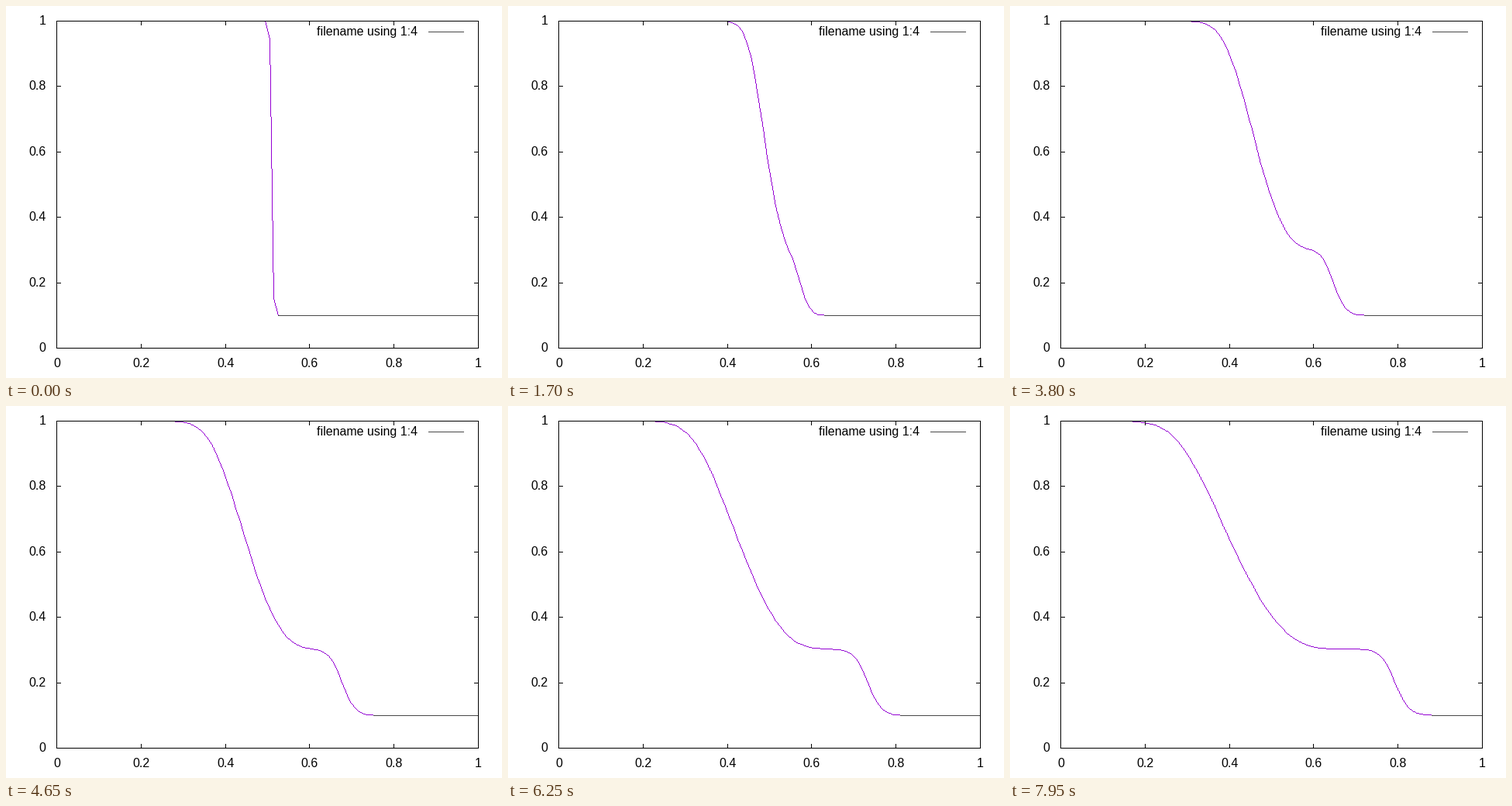
A matplotlib script for the animation above (8 s loop, 640x480 px).

```python
import numpy as np
import matplotlib.pyplot as plt
from matplotlib.animation import FuncAnimation

W, H, DPI = 640, 480, 100
LEFT, RIGHT, TOP, BOTTOM = 65, 609, 19, 441
FRAMES, INTERVAL = 160, 50
CELLS, DT, GAMMA = 100, 0.001, 1.4
PURPLE, GRAY, BLACK = (148, 0, 211), (72, 72, 72), (0, 0, 0)


def px(x):
    return np.rint(LEFT + (RIGHT - LEFT) * np.asarray(x)).astype(int)


def py(y):
    return np.rint(BOTTOM - (BOTTOM - TOP) * np.asarray(y)).astype(int)


def primitives(state):
    rho, mom, energy = state
    u = mom / rho
    return rho, u, (GAMMA - 1) * (energy - 0.5 * rho * u**2)


def advance(state):
    """One first-order Lax-Friedrichs step using the global wave speed."""
    s = np.pad(state, ((0, 0), (1, 1)), mode="edge")
    rho, u, p = primitives(s)
    speed = np.max(np.abs(u) + np.sqrt(GAMMA * p / rho))
    flux = np.array([s[1], s[1] * u + p, (s[2] + p) * u])
    face = 0.5 * (flux[:, 1:] + flux[:, :-1]) - 0.5 * speed * (s[:, 1:] - s[:, :-1])
    return state - DT * CELLS * (face[:, 1:] - face[:, :-1])


def shock_tube():
    left = np.arange(CELLS) <= CELLS // 2
    rho, p = np.where(left, 1.0, 0.125), np.where(left, 1.0, 0.1)
    state = np.array([rho, 0 * rho, p / (GAMMA - 1)])
    history = []
    for _ in range(FRAMES):
        state = advance(state)
        history.append(primitives(state)[2])
    return history


def polyline(img, xs, ys, color):
    for x0, y0, x1, y1 in zip(xs[:-1], ys[:-1], xs[1:], ys[1:]):
        n = max(abs(x1 - x0), abs(y1 - y0)) + 1
        cols = np.rint(np.linspace(x0, x1, n)).astype(int)
        rows = np.rint(np.linspace(y0, y1, n)).astype(int)
        img[rows, cols] = color


def draw_border(img):
    img[[TOP, BOTTOM], LEFT:RIGHT + 1] = BLACK
    img[TOP:BOTTOM + 1, [LEFT, RIGHT]] = BLACK
    for v in TICKS:
        x, y = px(v), py(v)
        img[TOP:TOP + 6, x] = img[BOTTOM - 5:BOTTOM + 1, x] = BLACK
        img[y, LEFT:LEFT + 6] = img[y, RIGHT - 5:RIGHT + 1] = BLACK


def render(pressure):
    img = np.full((H, W, 3), 255, np.uint8)
    xs = px(np.concatenate([[0], (np.arange(CELLS) + 0.5) / CELLS, [1]]))
    ys = py(np.pad(pressure, 1, mode="edge"))
    polyline(img, xs, ys, PURPLE)
    floor = img[py(0.1)]
    floor[floor[:, 1] == 0] = GRAY
    img[33, 545:591] = GRAY
    draw_border(img)
    return img


TICKS = [0, 0.2, 0.4, 0.6, 0.8, 1]
pressures = shock_tube()

fig = plt.figure(figsize=(W / DPI, H / DPI), dpi=DPI, facecolor="white")
ax = fig.add_axes([0, 0, 1, 1])
ax.axis("off")
picture = ax.imshow(render(pressures[0]), extent=(0, W, H, 0),
                    interpolation="nearest", aspect="auto")
ax.set_xlim(0, W)
ax.set_ylim(H, 0)


def label(x, baseline, text, align):
    ax.text(x, baseline, text, ha=align, va="baseline", color="black",
            family="Liberation Sans", size=16 * 72 / DPI)


for v in TICKS:
    label(px(v) + 0.5, 466, f"{v:g}", "center")
    label(51.5, py(v) + 5, f"{v:g}", "right")
label(531, 38, "filename using 1:4", "right")


def update(frame):
    picture.set_data(render(pressures[frame]))
    return [picture]


anim = FuncAnimation(fig, update, frames=FRAMES, interval=INTERVAL, repeat=True)
plt.show()
```
